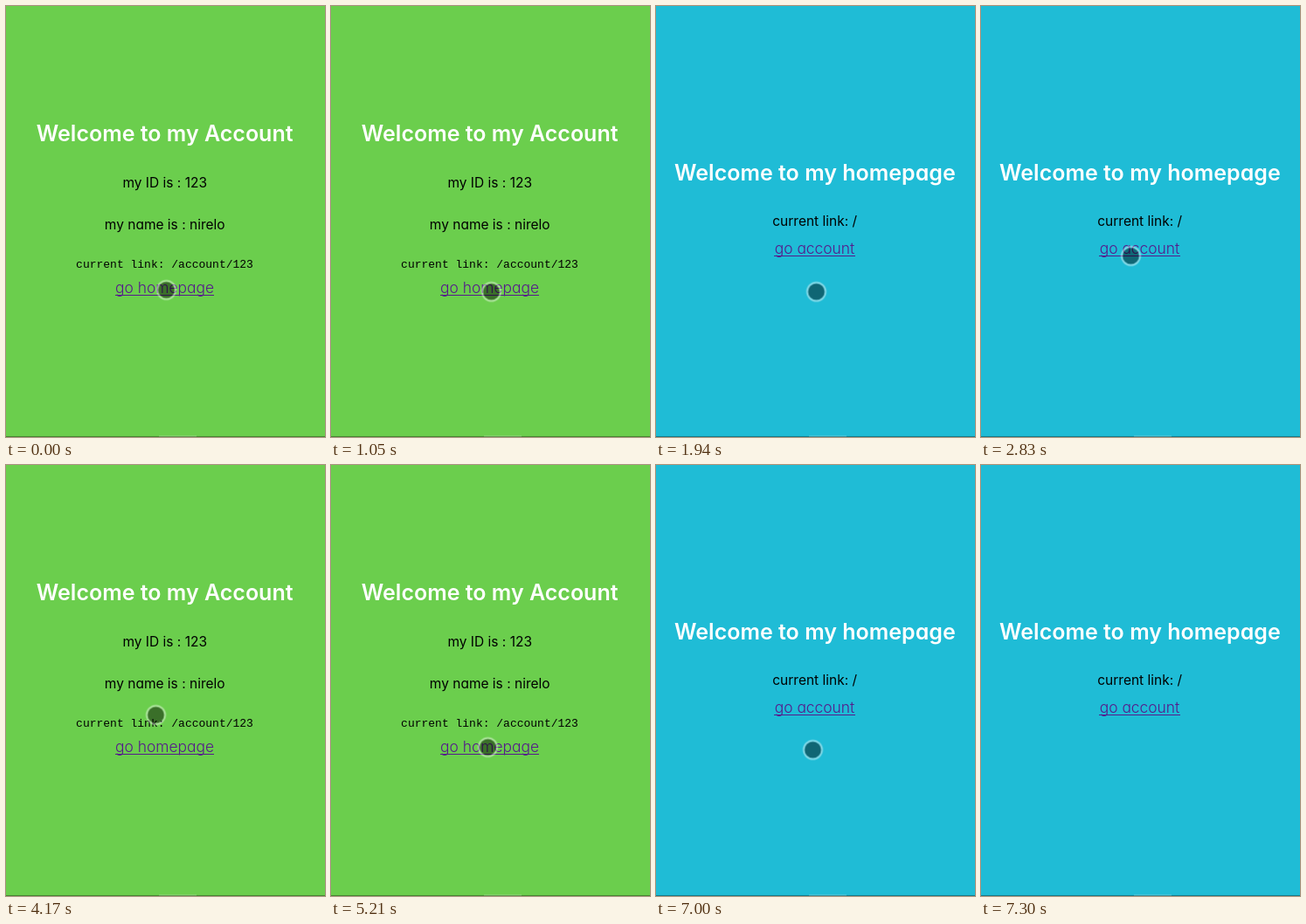
Animation, 365 px wide and 494 px high, one loop 8810 ms. Source, as an HTML page:

```html
<!DOCTYPE html>
<html lang="en">
<head>
<meta charset="utf-8">
<title>Account and homepage</title>
<style>
  html, body { margin: 0; width: 100%; height: 100%; overflow: hidden; }
  svg { display: block; width: 365px; height: 494px; }

  text {
    font: 400 15.5px Inter, Lato, sans-serif;
    font-feature-settings: "cv11";
    font-optical-sizing: none;
    text-anchor: middle;
  }
  .title { font-size: 25px; font-weight: 600; fill: #fff; }
  .mono { font: 13px "Liberation Mono", monospace; }
  .link text { font-size: 17.4px; font-weight: 300; }
  .link { fill: #551a8b; }

  .home, .press, .touch, .spot { animation: 8810ms step-end infinite; }
  .home { animation-name: page; }
  .press { animation-name: press; }
  .tap { fill: #5abd8c; }
  .pressed { fill: #c8405c; }
  .touch { animation-name: move; }
  .spot { animation-name: lift; }

  @keyframes page {
    0%, 47.33% { visibility: hidden; }
    22.02%, 79.45%, 100% { visibility: visible; }
  }
  @keyframes press {
    0%, 22.02%, 100% { visibility: hidden; }
    20.31% { visibility: visible; }
  }
  @keyframes lift {
    0% { visibility: visible; }
    82.86%, 100% { visibility: hidden; }
  }
  @keyframes move {
    0% { transform: translate(183.5px, 325.5px); }
    1.7% { transform: translate(183.5px, 326.5px); }
    11.91% { transform: translate(183.5px, 327.5px); }
    25.31% { transform: translate(183.5px, 324.5px); }
    27.01% { transform: translate(179.5px, 304.5px); }
    28.71% { transform: translate(174.5px, 293.5px); }
    30.42% { transform: translate(172.5px, 288.5px); }
    32.12% { transform: translate(171.5px, 286.5px); }
    50.73% { transform: translate(171.5px, 289.5px); }
    52.32% { transform: translate(174.5px, 300.5px); }
    54.02% { transform: translate(176.5px, 316.5px); }
    55.73% { transform: translate(177.5px, 321.5px); }
    57.43% { transform: translate(178.5px, 322.5px); }
    59.13% { transform: translate(179.5px, 323.5px); }
    62.42% { transform: translate(179.5px, 324.5px); }
    76.04% { transform: translate(179.5px, 325.5px); }
    77.75%, 100% { transform: translate(179.5px, 326.5px); }
  }
</style>
</head>
<body>
<svg viewBox="0 0 365 494">
  <g class="account">
    <rect width="365" height="494" fill="#6bce4d"/>
    <text class="title" x="181.7" y="155">Welcome to my Account</text>
    <text x="181.7" y="208">my ID is : 123</text>
    <text x="181.7" y="256">my name is : nirelo</text>
    <text class="mono" x="181.5" y="300">current link: /account/123</text>
    <g class="link">
      <text x="181.5" y="329">go homepage</text>
      <rect x="125" y="331" width="113" height="1"/>
    </g>
    <g class="press">
      <rect class="tap" x="124" y="316" width="115" height="17"/>
      <g class="link pressed">
        <text x="181.5" y="329">go homepage</text>
        <rect x="125" y="331" width="113" height="1"/>
      </g>
    </g>
  </g>

  <g class="home">
    <rect width="365" height="494" fill="#1fbcd6"/>
    <text class="title" x="181.9" y="200">Welcome to my homepage</text>
    <text x="181.7" y="252">current link: /</text>
    <g class="link">
      <text x="181.5" y="284">go account</text>
      <rect x="135" y="286" width="93" height="1"/>
    </g>
  </g>

  <rect y="493" width="365" height="1" fill="#000" opacity=".35"/>
  <rect x="175" y="492" width="43" height="2" fill="#fff" opacity=".15"/>

  <g class="touch">
    <g class="spot">
      <circle r="9.6" fill="#000" fill-opacity=".46"/>
      <circle r="10.5" fill="none" stroke="#fff" stroke-opacity=".45" stroke-width="2"/>
    </g>
  </g>
</svg>
</body>
</html>
```
